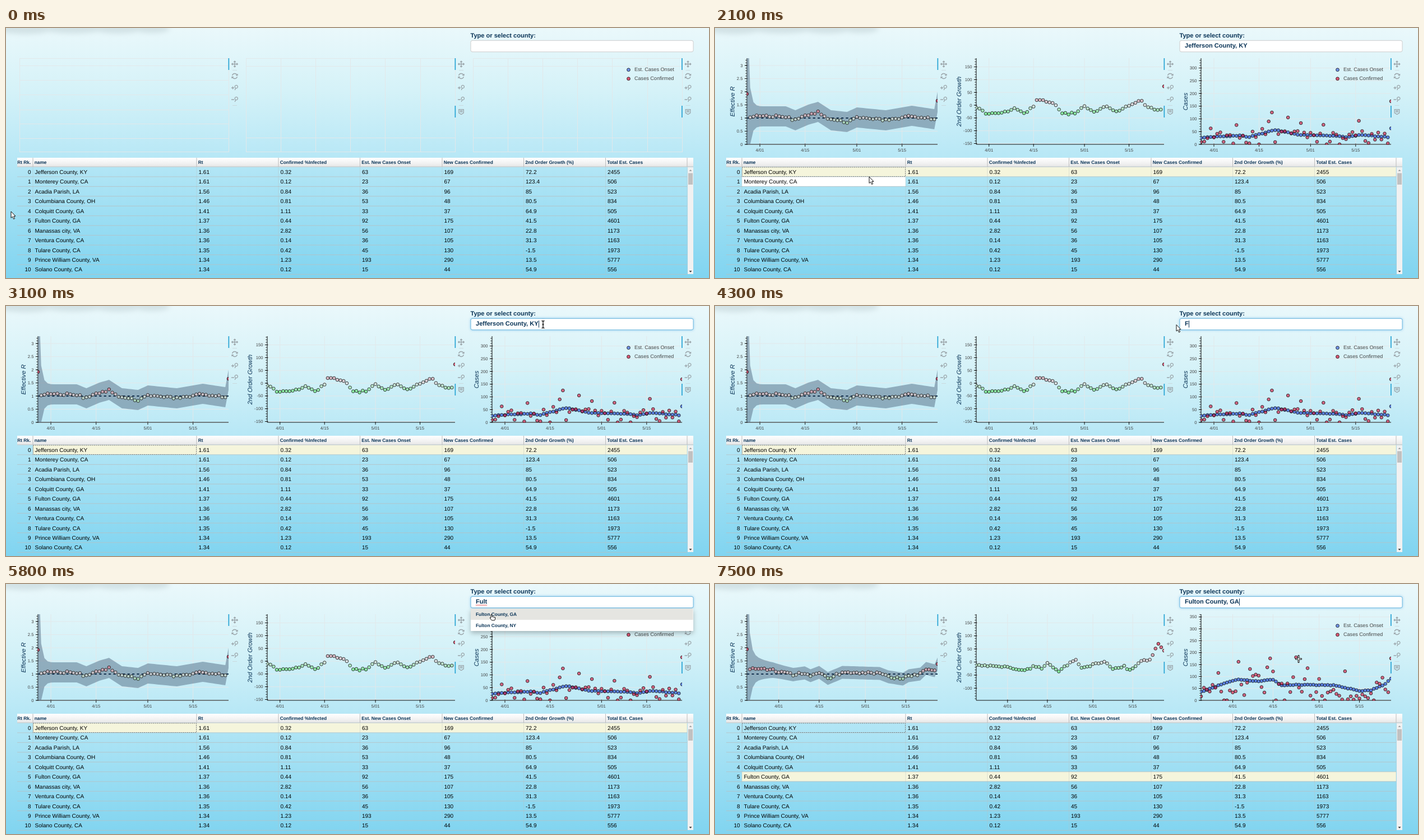
An HTML page for the animation above (8 s loop, 1254 by 447 pixels).

```html
<!DOCTYPE html>
<html lang="en">
<head>
<meta charset="utf-8">
<title>County dashboard</title>
<style>
html, body { margin: 0; width: 100%; height: 100%; overflow: hidden; }
svg { display: block; width: 1254px; height: 447px; font-family: "Liberation Sans", Arial, sans-serif; text-rendering: geometricPrecision; }
.bold { font-weight: bold; fill: #0b3558; }
.tick { font-size: 7.7px; fill: #444; }
.axis-title { font-size: 11.2px; font-style: italic; fill: #0b3558; text-anchor: middle; }
.icon { fill: none; stroke: #9ba5aa; stroke-width: 1.3; }
</style>
</head>
<body>
<svg id="stage" viewBox="0 0 1254 447">
  <defs>
    <linearGradient id="sky" x2="0" y2="1">
      <stop offset="0" stop-color="#eaf8fb"/><stop offset=".25" stop-color="#d5f2f8"/>
      <stop offset=".5" stop-color="#b9e8f6"/><stop offset="1" stop-color="#80d4f0"/>
    </linearGradient>
    <linearGradient id="head" x2="0" y2="1">
      <stop offset="0" stop-color="#fff"/><stop offset=".5" stop-color="#f4f4f4"/><stop offset="1" stop-color="#e6e6e6"/>
    </linearGradient>
    <filter id="blur" x="-20%" y="-100%" width="140%" height="300%"><feGaussianBlur stdDeviation="4"/></filter>
    <filter id="glow" x="-5%" y="-50%" width="110%" height="200%"><feGaussianBlur stdDeviation="2.2"/></filter>
    <filter id="shadow" x="-5%" y="-30%" width="110%" height="180%"><feDropShadow dx="0" dy="4" stdDeviation="4" flood-opacity=".25"/></filter>
  </defs>
</svg>
<script>
const LOOP = 8000, STEP = 100;
const stage = document.getElementById('stage');

function el(parent, name, attrs = {}, text) {
  const node = document.createElementNS('http://www.w3.org/2000/svg', name);
  for (const key in attrs) node.setAttribute(key, attrs[key]);
  if (text !== undefined) node.textContent = text;
  return parent.appendChild(node);
}
const group = (parent = stage, attrs) => el(parent, 'g', attrs);
const rect = (p, x, y, width, height, fill, more) => el(p, 'rect', { x, y, width, height, fill, ...more });
const line = (p, x1, y1, x2, y2, stroke, more) => el(p, 'line', { x1, y1, x2, y2, stroke, ...more });
const label = (p, x, y, text, size, more) => el(p, 'text', { x, y, 'font-size': size, ...more }, text);
const show = (node, on) => node.setAttribute('display', on ? 'inline' : 'none');

// Values at a position between key points [position, ...values]
function interpolate(keys, at) {
  const next = keys.findIndex(key => key[0] >= at);
  if (next <= 0) return (next ? keys[keys.length - 1] : keys[0]).slice(1);
  const a = keys[next - 1], b = keys[next], k = (at - a[0]) / (b[0] - a[0]);
  return a.slice(1).map((v, i) => v + (b[i + 1] - v) * k);
}

function randomizer(seed) {
  return () => (seed = (seed * 16807) % 2147483647) / 2147483647;
}

// Backdrop
rect(stage, 0, 0, 1254, 447, 'url(#sky)');
const smudge = group(stage, { filter: 'url(#blur)', fill: '#a9bcc0', opacity: .35 });
for (const [cx, rx, ry] of [[35, 50, 10], [120, 55, 9], [200, 45, 9], [260, 32, 8]])
  el(smudge, 'ellipse', { cx, cy: 1, rx, ry });

// Charts: key points are [day, screen y]
const TOP = 54, BOTTOM = 208;
const frames = [[57, 397], [466, 801], [867, 1206]];
const jefferson = {
  days: 60, firstOfApril: 4, seed: 4217, margin: 18, settling: 0,
  scales: [
    { zero: 208, unit: 47, step: .5, from: 0, to: 3 },
    { zero: 138, unit: .4567, step: 50, from: -150, to: 150 },
    { zero: 208, unit: .455, step: 50, from: 0, to: 300 }],
  rate: [[0, 117], [1, 158], [12, 158], [15, 165], [19, 155], [22, 150], [26, 165], [31, 168], [34, 160], [43, 165], [51, 157], [58, 163], [59, 132]],
  growth: [[0, 141], [3, 152], [10, 150], [12, 142], [15, 153], [18, 140], [19, 128], [24, 133], [27, 153], [31, 153], [34, 139],
    [37, 150], [41, 139], [44, 149], [52, 129], [54, 143], [58, 146], [59, 105]],
  onset: [[0, 196], [12, 192], [15, 195], [22, 183], [24, 183], [30, 191], [39, 192], [45, 195], [50, 191], [58, 195], [59, 180]],
  surges: { 3: 179.5, 11: 173.5, 21: 167, 22: 151, 27: 160, 31: 170, 38: 173, 49: 166, 59: 131 }
};
const fulton = {
  days: 67, firstOfApril: 11, seed: 905, margin: 11.5, settling: 24,
  scales: [
    { zero: 208, unit: 47, step: .5, from: 0, to: 3 },
    { zero: 139.5, unit: .468, step: 50, from: -100, to: 150 },
    { zero: 208, unit: .426, step: 50, from: 0, to: 350 }],
  rate: [[0, 118], [1, 151], [9, 154], [16, 162], [20, 159], [22, 164], [25, 158], [28, 169], [33, 158], [46, 160], [49, 166],
    [54, 170], [56, 164], [60, 161], [62, 151], [65, 155], [66, 143]],
  growth: [[0, 145], [9, 147], [17, 155], [20, 148], [23, 151], [25, 142], [29, 156], [33, 140], [35, 137], [37, 149], [45, 140],
    [48, 151], [52, 147], [54, 155], [58, 136], [61, 135], [64, 106], [66, 120]],
  onset: [[0, 193], [9, 176], [13, 171], [20, 174], [25, 171], [28, 181], [33, 180], [46, 181], [55, 191], [59, 190], [64, 179], [66, 169]],
  surges: { 6: 159, 13: 139, 17: 152, 23: 149, 24: 133, 33: 131, 37: 150.5, 50: 156, 66: 133 }
};

function simulate(data) {
  const random = randomizer(data.seed);
  const days = [...Array(data.days).keys()];
  const follow = (keys, jitter) => days.map(day => interpolate(keys, day)[0] + (random() - .5) * jitter);
  const trend = follow(data.rate, 0);
  const margin = day => data.margin + data.settling * Math.exp(-day / 4) + 150 * Math.exp(-1.5 * day);
  const onset = follow(data.onset, 1.2);
  return {
    upper: trend.map((y, day) => y - margin(day)),
    lower: trend.map((y, day) => Math.min(BOTTOM, y + margin(day))),
    rate: follow(data.rate, 4),
    growth: follow(data.growth, 3.5),
    onset,
    // Reports scatter around the onset, often far below it
    confirmed: onset.map((y, day) => data.surges[day] ?? BOTTOM - (BOTTOM - y) * Math.max(0, 1.7 * random() - .15))
  };
}

const GRID = '#e2e8ea';
function emptyCharts() {
  const g = group(stage, { 'shape-rendering': 'crispEdges' });
  [24, 428, 833].forEach((x, i) => {
    rect(g, x, TOP, 373, 167, 'none', { stroke: GRID });
    const rows = i ? [68, 196] : [67, 93, 119, 146, 171, 197];
    for (const y of rows) line(g, x, y, x + 373, y, GRID);
    if (i) for (let k = 1; k < 6; k++) line(g, x + k * 62.2, TOP, x + k * 62.2, 221, GRID);
  });
  return g;
}

function diverging(t) {
  const end = t < 0 ? [110, 240, 130] : [220, 50, 85];
  const k = Math.min(1, Math.abs(t));
  return `rgb(${end.map(c => Math.round(222 + (c - 222) * k))})`;
}

const dayX = ([x0, x1], day, days) => x0 + (x1 - x0) * day / (days - 1);

function points(parent, ys, frame, fill, opacity) {
  ys.forEach((cy, day) => el(parent, 'circle', {
    cx: dayX(frame, day, ys.length), cy, r: 2.8,
    fill: typeof fill === 'function' ? fill(cy) : fill, 'fill-opacity': opacity,
    stroke: '#111', 'stroke-width': .8
  }));
}

function axes(parent, frame, scale, data, title, titleX) {
  const [x0, x1] = frame;
  const yOf = v => scale.zero - v * scale.unit;
  for (const [date, offset] of [['4/01', 0], ['4/15', 14], ['5/01', 30], ['5/15', 44]]) {
    const x = dayX(frame, data.firstOfApril + offset, data.days);
    line(parent, x, TOP, x, BOTTOM, GRID);
    line(parent, x, BOTTOM - 1.4, x, BOTTOM + 4.2, '#111');
    label(parent, x, 221.2, date, 7.7, { class: 'tick', 'text-anchor': 'middle' });
  }
  for (let v = scale.from; v <= scale.to; v += scale.step) {
    const y = yOf(v);
    line(parent, x0, y, x1, y, GRID);
    line(parent, x0 - 4.2, y, x0 + 1.4, y, '#111');
    label(parent, x0 - 7.5, y + 2.5, v, 7.7, { class: 'tick', 'text-anchor': 'end' });
  }
  for (let v = scale.from - scale.step; yOf(v) > TOP; v += scale.step / 5)
    if (yOf(v) <= BOTTOM) line(parent, x0 - 2.8, yOf(v), x0, yOf(v), '#111', { 'stroke-width': .8 });
  line(parent, x0, TOP, x0, BOTTOM, '#111');
  line(parent, x0, BOTTOM, x1, BOTTOM, '#111');
  el(parent, 'text', { class: 'axis-title', transform: `translate(${titleX} 131.5) rotate(-90)` }, title);
}

for (const [i, [x0, x1]] of frames.entries())
  rect(el(stage.querySelector('defs'), 'clipPath', { id: 'frame' + i }), x0 - .5, TOP, x1 - x0 + .5, BOTTOM - TOP + .5);

function charts(data) {
  const g = group(), series = simulate(data);
  const [rateScale, growthScale] = data.scales;
  ['Effective R', '2nd Order Growth', 'Cases'].forEach((title, i) =>
    axes(g, frames[i], data.scales[i], data, title, [34.5, 438.5, 843][i]));
  const [ratePlot, growthPlot, casesPlot] = frames.map((_, i) => group(g, { 'clip-path': `url(#frame${i})` }));

  const outline = ys => ys.map((y, day) => [dayX(frames[0], day, data.days), y]);
  el(ratePlot, 'polygon', {
    points: [...outline(series.upper), ...outline(series.lower).reverse()].join(' '), fill: '#647e95', 'fill-opacity': .58
  });
  line(ratePlot, 57, 161, 397, 161, '#14324f', { 'stroke-width': 1.8, 'stroke-dasharray': '4.2 4.2' });
  points(ratePlot, series.rate, frames[0], y => diverging(((rateScale.zero - y) / rateScale.unit - 1) * 2.2), .72);
  points(growthPlot, series.growth, frames[1], y => {
    const v = (growthScale.zero - y) / growthScale.unit;
    return diverging(v / (v < 0 ? 35 : 65));
  }, .75);
  points(casesPlot, series.onset, frames[2], '#4169e1', .8);
  points(casesPlot, series.confirmed, frames[2], '#dc143c', .62);
  return g;
}
const views = [emptyCharts(), charts(jefferson), charts(fulton)];

[['Est. Cases Onset', '#4169e1', 74.7], ['Cases Confirmed', '#dc143c', 90.7]].forEach(([text, fill, cy]) => {
  el(stage, 'circle', { cx: 1110.5, cy, r: 2.9, fill, 'fill-opacity': .7, stroke: '#111', 'stroke-width': .8 });
  label(stage, 1121, cy + 2.5, text, 9.1, { fill: '#444' });
});

function toolbar(cx, hasHover) {
  const g = group(stage, { class: 'icon', transform: `translate(${cx} 0)` });
  const icon = (y, d) => el(g, 'path', { d, transform: `translate(0 ${y})` });
  const activeBar = y => rect(g, -11.5, y, 1.7, 21, '#26a3d4', { stroke: 'none' });
  activeBar(54);
  icon(64.5, 'M-5 0H5M0-5V5M-3.5-1.8L-5.3 0L-3.5 1.8M3.5-1.8L5.3 0L3.5 1.8M-1.8-3.5L0-5.3L1.8-3.5M-1.8 3.5L0 5.3L1.8 3.5');
  icon(86, 'M-4.3-1A4.3 4.3 0 0 1 4-1.6M4.3 1A4.3 4.3 0 0 1-4 1.6M5-4V-1.4H2.2M-5 4V1.4H-2.2');
  const lens = 'M.2-2A2.6 2.6 0 1 1 5.4-2A2.6 2.6 0 1 1 .2-2M1.8.4L.2 4';
  icon(107, lens + 'M-6 0H-1M-3.5-2.5V2.5');
  icon(128, lens + 'M-6 0H-1');
  for (const y of [75.5, 138.5]) line(g, -4, y, 4, y, '#c9d4d8', { 'stroke-width': .8 });
  if (hasHover) {
    activeBar(139);
    icon(150, 'M-4.2-4.3H4.2V1.8L0 4.5L-4.2 1.8ZM-2.5-2H2.5M-2.5 .2H2.5');
  }
}
toolbar(408, false);
toolbar(812, true);
toolbar(1216.5, true);

// Table
const columns = [20, 48, 340, 486, 631.5, 778, 923.5, 1069.5, 1215];
const ROW = 17.45, rowTop = i => 248.5 + i * ROW;
const headings = ['Rt Rk.', 'name', 'Rt', 'Confirmed %Infected', 'Est. New Cases Onset', 'New Cases Confirmed',
  '2nd Order Growth (%)', 'Total Est. Cases'];
const records = `Jefferson County, KY|1.61|0.32|63|169|72.2|2455
Monterey County, CA|1.61|0.12|23|67|123.4|506
Acadia Parish, LA|1.56|0.84|36|96|85|523
Columbiana County, OH|1.46|0.81|53|48|80.5|834
Colquitt County, GA|1.41|1.11|33|37|64.9|505
Fulton County, GA|1.37|0.44|92|175|41.5|4601
Manassas city, VA|1.36|2.82|56|107|22.8|1173
Ventura County, CA|1.36|0.14|36|105|31.3|1163
Tulare County, CA|1.35|0.42|45|130|-1.5|1973
Prince William County, VA|1.34|1.23|193|290|13.5|5777
Solano County, CA|1.34|0.12|15|44|54.9|556`.split('\n').map(row => row.split('|'));

const selectedRow = rect(stage, 48, 0, 1167, ROW - .5, '#f5f5dc');
const hoverCell = rect(stage, 48, 0, 292, ROW - .5, '#fff');
records.forEach((record, i) => {
  const y = rowTop(i);
  line(stage, 20, y + ROW, 1215, y + ROW, '#b8c0c2', { 'stroke-width': .8 });
  label(stage, 44.5, y + 12.4, i, 10, { 'text-anchor': 'end' });
  record.forEach((text, k) => label(stage, columns[k + 1] + 3.5, y + 12.4, text, 10));
});
for (const x of columns.slice(1))
  line(stage, x, 248, x, 440, '#b8c0c2', { 'stroke-width': .8, 'stroke-dasharray': '1 1' });
rect(stage, 20, 232, 1206, 16.5, 'url(#head)');
line(stage, 20, 248, 1226, 248, '#bcc4c6');
headings.forEach((text, k) => label(stage, columns[k] + (k ? 2.7 : .2), 242.8, text, 8.35, { class: 'bold' }));
for (const x of columns.slice(1)) line(stage, x, 232, x, 248, '#bbb');
const activeCell = rect(stage, 48.5, 249, 291, 16.5, 'none', { stroke: '#666', 'stroke-width': .8, 'stroke-dasharray': '2 1.5' });

rect(stage, 1216, 249, 10, 191, '#f1f1f1');
rect(stage, 1217, 259.5, 8, 20.5, '#c1c1c1');
el(stage, 'path', { d: 'M1218.5 256L1221 253L1223.5 256Z', fill: '#a3a3a3' });
el(stage, 'path', { d: 'M1218.5 434L1221 437L1223.5 434Z', fill: '#404040' });

// County search
label(stage, 828.5, 17.3, 'Type or select county:', 11.05, { class: 'bold' });
const focusGlow = rect(stage, 828, 21.3, 399, 22.4, '#66afe9', { rx: 4, filter: 'url(#glow)', opacity: .45 });
const box = rect(stage, 829, 22.3, 397, 20.4, '#fff', { rx: 3 });
const selection = rect(stage, 838, 25.5, 0, 13.5, '#3390ff');
const query = label(stage, 838, 35.4, '', 11.05, { class: 'bold' });
const caret = rect(stage, 0, 26, 1, 12.5, '#0b3558');
const squiggle = el(stage, 'path', {
  d: 'M838 37.3' + 'l1 1l1-1'.repeat(10), fill: 'none', stroke: '#e33', 'stroke-width': .9
});

const dropdown = group();
rect(dropdown, 829, 44, 397, 40, '#fff', { filter: 'url(#shadow)' });
const option = rect(dropdown, 829, 44, 396.5, 20, '#e5e5e1');
label(dropdown, 838, 56.5, 'Fulton County, GA', 8.35, { class: 'bold' });
label(dropdown, 838, 76.6, 'Fulton County, NY', 8.35, { class: 'bold' });

// Pointer
const pointer = group();
const shape = (d, attrs) => el(pointer, 'path', { d, fill: '#fff', stroke: '#111', 'stroke-width': 1, 'stroke-linejoin': 'round', ...attrs });
const pointers = {
  arrow: shape('M0 0V11.5L2.7 9.2L4.6 13.6L6.6 12.7L4.8 8.4H8Z'),
  beam: shape('M-2.5-6.5Q0-6.5 0-5V5Q0 6.5-2.5 6.5M2.5-6.5Q0-6.5 0-5V5Q0 6.5 2.5 6.5M-1.5 0H1.5', { fill: 'none', 'stroke-width': 1.3 }),
  hand: shape('M-1 1Q0-.5 1 1V4.5L6.5 5.5V9L5.5 11H.5L-3 6.5Q-2.5 5.3-1 6.5Z'),
  cross: shape('M-1-6.5H1V-1H5.5V1H1V6.5H-1V1H-5.5V-1H-1Z')
};
const journey = [
  [400, 9, 328], [500, 20, 332], [900, 107, 259], [1800, 107, 259],
  [1900, 252, 264], [2000, 252, 264], [2100, 275, 266], [2300, 486, 252], [2400, 486, 252],
  [3000, 935, 45], [3100, 958, 33], [3300, 946, 33], [3400, 829, 37], [3500, 829, 37], [3600, 823, 33.5],
  [5200, 823, 33.5], [5300, 836, 28], [5500, 856, 44], [5800, 866, 54], [6200, 866, 54],
  [6300, 866, 53], [6800, 866, 53], [7200, 1024, 114], [7300, 1024, 114], [7500, 1041, 134]];

const typed = [[0, ''], [2100, 'Jefferson County, KY'], [4300, 'F'], [4500, 'Fu'], [4600, 'Ful'], [4800, 'Fult'], [6300, 'Fulton County, GA']];
const caretTimes = [[3100, 3400], [4300, 5300], [6300, 6900], [7400, 8000]];

function render(t) {
  const during = (from, to) => t >= from && t < to;
  const view = t < 2100 ? 0 : t < 6300 ? 1 : 2;
  views.forEach((g, i) => show(g, i === view));

  const [x, y] = interpolate(journey, t);
  const open = during(4500, 6300);
  const overOption = open && x >= 829 && y >= 44;
  const overInput = x >= 829 && y >= 22 && y < 44;
  const overPlot = view > 0 && y >= TOP && y <= BOTTOM && frames.some(([a, b]) => x >= a && x <= b);
  const kind = overOption ? 'hand' : overInput ? 'beam' : overPlot ? 'cross' : 'arrow';
  for (const name in pointers) show(pointers[name], name === kind);
  pointer.setAttribute('transform', `translate(${x} ${y})`);

  const row = Math.floor((y - rowTop(0)) / ROW);
  const chosen = view === 2 ? 5 : 0;
  show(hoverCell, row >= 0 && x >= 48 && x < 340 && !(view && row === chosen));
  hoverCell.setAttribute('y', rowTop(row));
  show(selectedRow, view > 0);
  selectedRow.setAttribute('y', rowTop(chosen));
  show(activeCell, view > 0);

  const focused = t >= 3100, selected = during(3400, 4300);
  show(focusGlow, focused);
  box.setAttribute('stroke', focused ? '#66b5dd' : '#ccc');
  query.textContent = typed.filter(([from]) => t >= from).pop()[1];
  query.style.fill = selected ? '#fff' : '';
  const width = query.textContent ? query.getComputedTextLength() : 0;
  show(selection, selected);
  selection.setAttribute('width', width);
  show(caret, caretTimes.some(([from, to]) => during(from, to)));
  caret.setAttribute('x', Math.round(838 + width));
  show(squiggle, during(5300, 6300));
  show(dropdown, open);
  show(option, overOption);
}

function tick(now) {
  render(Math.floor(now % LOOP / STEP) * STEP);
  requestAnimationFrame(tick);
}
render(0);
requestAnimationFrame(tick);
</script>
</body>
</html>
```
